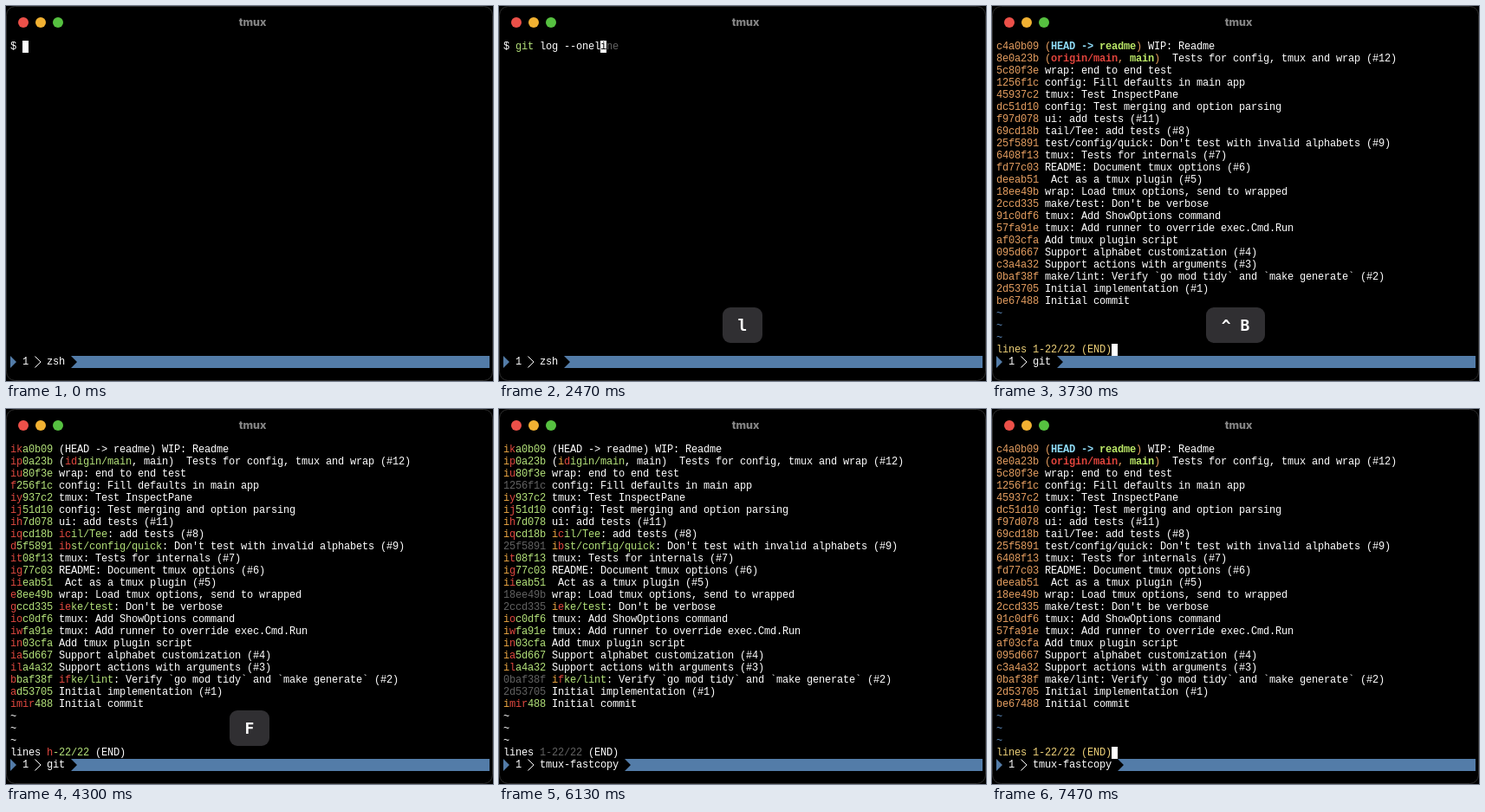
An HTML page that plays this animation: 562 px wide and 433 px high, repeating every 8 s.

```html
<!DOCTYPE html>
<html lang="en">
<head>
<meta charset="utf-8">
<title>tmux</title>
<style>
  html, body { margin: 0; width: 100%; height: 100%; overflow: hidden; background: #000; }
  svg { display: block; width: 562px; height: 433px; }
  text { white-space: pre; fill: #fff; }
  #screen text, #status text { font: 12px "Liberation Mono", monospace; }
  #keycap text { font: bold 18px "DejaVu Sans Mono", monospace; text-anchor: middle; }
  #screen .title, .title { font: 800 12.5px Inter, sans-serif; text-anchor: middle; fill: #858585; }
  .hash { fill: #e59e60; }
  .head { fill: #8fdcf8; font-weight: bold; }
  .branch { fill: #bdea68; font-weight: bold; }
  .remote { fill: #e0443c; font-weight: bold; }
  .prompt { fill: #edd078; }
  .tilde { fill: #5a88bb; }
  .cmd, .match { fill: #b4e27a; }
  .hint { fill: #e0483f; }
  .typed { fill: #eda843; }
  .dim { fill: #626262; }
  .under { fill: #000; }
  .cursor { fill: #fff; }
  .bar { fill: #537ca8; }
</style>
</head>
<body>
<svg viewBox="0 0 562 433">
  <rect width="562" height="433" fill="#000"/>
  <rect x=".5" y=".5" width="561" height="432" rx="10" fill="#000" stroke="#303030"/>
  <circle cx="20" cy="19" r="6" fill="#ec5049"/>
  <circle cx="40" cy="19" r="6" fill="#f1b132"/>
  <circle cx="60" cy="19" r="6" fill="#56c140"/>
  <text class="title" x="284.5" y="23">tmux</text>
  <g id="screen"></g>
  <g id="status"></g>
  <g id="keycap"></g>
</svg>
<script>
const LOOP = 8000, CELL = 7, LINE = 14, LEFT = 5, TOP = 40;
const COMMAND = "git log --oneline";
const KEY_TIMES = [400, 500, 600, 700, 1170, 1400, 1430, 1570, 1730, 1900,
  2170, 2270, 2330, 2400, 2500, 2570, 2670];

// hash, message, hint for the hash, hint for a path in the message
const LOG = [
  ["c4a0b09", "(HEAD -> readme) WIP: Readme", "ik"],
  ["8e0a23b", "(origin/main, main)  Tests for config, tmux and wrap (#12)", "ip", "id"],
  ["5c80f3e", "wrap: end to end test", "iu"],
  ["1256f1c", "config: Fill defaults in main app", "f"],
  ["45937c2", "tmux: Test InspectPane", "iy"],
  ["dc51d10", "config: Test merging and option parsing", "ij"],
  ["f97d078", "ui: add tests (#11)", "ih"],
  ["69cd18b", "tail/Tee: add tests (#8)", "iq", "ic"],
  ["25f5891", "test/config/quick: Don't test with invalid alphabets (#9)", "d", "ib"],
  ["6408f13", "tmux: Tests for internals (#7)", "it"],
  ["fd77c03", "README: Document tmux options (#6)", "ig"],
  ["deeab51", " Act as a tmux plugin (#5)", "ii"],
  ["18ee49b", "wrap: Load tmux options, send to wrapped", "e"],
  ["2ccd335", "make/test: Don't be verbose", "g", "ie"],
  ["91c0df6", "tmux: Add ShowOptions command", "io"],
  ["57fa91e", "tmux: Add runner to override exec.Cmd.Run", "iw"],
  ["af03cfa", "Add tmux plugin script", "in"],
  ["095d667", "Support alphabet customization (#4)", "ia"],
  ["c3a4a32", "Support actions with arguments (#3)", "il"],
  ["0baf38f", "make/lint: Verify `go mod tidy` and `make generate` (#2)", "b", "if"],
  ["2d53705", "Initial implementation (#1)", "a"],
  ["be67488", "Initial commit", "imir"]
];
const PATH = /\w+(?:\/\w+)+/;
const REF_CLASS = { "HEAD -> ": "head", "origin/main": "remote", readme: "branch", main: "branch" };

const byId = id => document.getElementById(id);
const colX = col => LEFT + col * CELL;
const rowY = row => TOP + row * LINE;

// One row of text from [string, class] parts, each glyph in its terminal cell
function line(row, parts) {
  let col = 0, spans = "";
  for (const [str, cls = ""] of parts) {
    const xs = [...str].map(() => colX(col++)).join(" ");
    if (str) spans += `<tspan x="${xs}" class="${cls}">${str.replace(/>/g, "&gt;")}</tspan>`;
  }
  return `<text y="${rowY(row) + 10}">${spans}</text>`;
}

const cursor = (col, row) =>
  `<rect class="cursor" x="${colX(col)}" y="${rowY(row)}" width="${CELL}" height="${LINE}"/>`;

const tildes = cls => [22, 23, 24].map(r => line(r, [["~", cls]])).join("");

function shell(n) {
  const suggest = n ? COMMAND.slice(n) : "";
  return cursor(n + 2, 0) + line(0, [
    ["$ "],
    [COMMAND.slice(0, Math.min(n, 3)), "cmd"],
    [COMMAND.slice(3, Math.max(n, 3))],
    [suggest.slice(0, 1), "under"],
    [suggest.slice(1), "dim"]
  ]);
}

function logRow([hash, msg], i) {
  const end = i < 2 ? msg.indexOf(")") + 1 : 0;
  const refs = msg.slice(0, end).split(/(HEAD -> |origin\/main|readme|main)/)
    .map(s => [s, REF_CLASS[s] || "hash"]);
  return line(i, [[hash, "hash"], [" "], ...refs, [msg.slice(end)]]);
}

function pager(count) {
  const rows = LOG.slice(0, count).map(logRow).join("");
  if (count < LOG.length) return rows + cursor(0, count);
  return rows + tildes("tilde") + line(25, [["lines 1-22/22 (END)", "prompt"]]) + cursor(19, 25);
}

function hinted(str, hint, prefix) {
  if (!hint.startsWith(prefix)) return [[str, "dim"]];
  return [[prefix, "typed"], [hint.slice(prefix.length), "hint"], [str.slice(hint.length), "match"]];
}

function hintedMessage(msg, hint, prefix) {
  if (!hint) return [[msg]];
  const [path] = msg.match(PATH), at = msg.indexOf(path);
  return [[msg.slice(0, at)], ...hinted(path, hint, prefix), [msg.slice(at + path.length)]];
}

function picker(prefix) {
  const rows = LOG.map(([hash, msg, hint, pathHint], i) =>
    line(i, [...hinted(hash, hint, prefix), [" "], ...hintedMessage(msg, pathHint, prefix)]));
  return rows.join("") + tildes() +
    line(25, [["lines "], ...hinted("1-22/22", "h", prefix), [" (END)"]]);
}

function status(name) {
  const x = colX(name.length + 7);
  return `<path class="bar" d="M5 404l7 7l-7 7z"/>
    <path d="M33.5 404.5l6.5 6.5l-6.5 6.5" fill="none" stroke="#fff"/>
    <path class="bar" d="M${x} 404H558V418H${x}l7-7z"/>` +
    line(26, [["  1   " + name]]);
}

function keycap(key) {
  if (!key) return "";
  const cells = key === "enter" ? 2.08 : key.length;
  const w = Math.round(35 + cells * 10.9);
  const box = `<rect x="${281 - w / 2}" y="348" width="${w}" height="41" rx="9" fill="#302f32"/>`;
  if (key === " ")
    return box + `<path d="M276 374v4h9.5v-4" fill="none" stroke="#fff" stroke-width="1.8"/>`;
  if (key === "enter")
    return box + `<rect x="270" y="358" width="21.5" height="21" rx="4" fill="#5b92cc"/>
      <path d="M275 364.5H283a3.7 3.7 0 0 1 0 7.8H277" fill="none" stroke="#fff" stroke-width="2.2"/>
      <path d="M278.5 368v8.6l-5.5-4.3z" fill="#fff"/>`;
  return box + `<text x="281" y="375">${key}</text>`;
}

const typedCount = t => KEY_TIMES.filter(k => k <= t).length;

function screenAt(t) {
  if (t < 2830) return shell(typedCount(t));
  if (t < 2930) return line(0, [["$ "], ["git", "cmd"], [COMMAND.slice(3)]]) + cursor(0, 1);
  if (t < 3000) return cursor(0, 0);
  if (t < 3030) return pager(3);
  if (t < 3070) return pager(10);
  if (t < 3100) return pager(17);
  if (t < 4300 || t >= 6830) return pager(LOG.length);
  return picker(t < 5600 ? "" : "i");
}

function nameAt(t) {
  return t < 3000 ? "zsh" : t < 3670 ? "bash" : t < 4370 ? "git" : "tmux-fastcopy";
}

function keyAt(t) {
  if (t < 2830) return COMMAND[typedCount(t) - 1];
  if (t < 3270) return "enter";
  if (t >= 3570 && t < 4000) return "^ B";
  if (t >= 4000 && t < 4600) return "F";
  if (t >= 5600 && t < 6100) return "i";
  if (t >= 6730 && t < 7200) return "k";
}

const shown = {};
function put(id, html) {
  if (shown[id] !== html) byId(id).innerHTML = shown[id] = html;
}

function draw(t) {
  put("screen", screenAt(t));
  put("status", status(nameAt(t)));
  put("keycap", keycap(keyAt(t)));
}

const start = performance.now();
function tick() {
  draw((performance.now() - start) % LOOP);
  requestAnimationFrame(tick);
}
draw(0);
requestAnimationFrame(tick);
</script>
</body>
</html>
```
